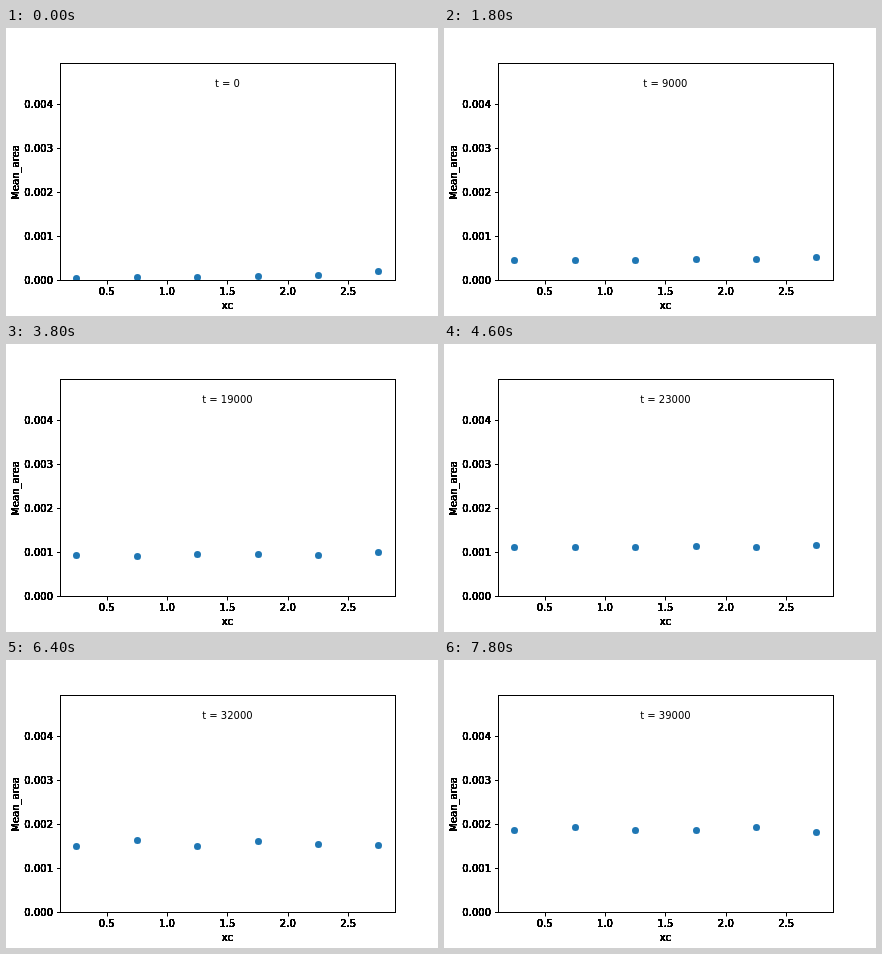
Recreate the animation shown at these times as an HTML page with a canvas. Size 432 by 288 pixels, loop 8 s.

```html
<!DOCTYPE html>
<html lang="en">
<head>
<meta charset="utf-8">
<title>Mean area over time</title>
<style>
  html, body { margin: 0; width: 100%; height: 100%; overflow: hidden; background: #fff; }
  canvas { display: block; width: 432px; height: 288px; }
</style>
</head>
<body>
<canvas id="plot" width="432" height="288"></canvas>
<script>
const ctx = document.getElementById('plot').getContext('2d');
const STEP_MS = 200, STEPS = 40;
const LEFT = 54, RIGHT = 389, TOP = 35, BOTTOM = 252, MIDDLE = 221.4;
const X_UNIT = 120.8, Y_TICK = 44;

// Each row: step, then the height of the six dots at that step.
const keys = [
  [0, 250, 249, 249, 248, 247, 243],
  [9, 232, 232, 232, 231, 231, 229],
  [13, 224, 224, 222, 222, 222, 221],
  [19, 211, 212, 210, 210, 211, 208],
  [27, 194, 194, 196, 194, 195, 194],
  [32, 186, 180, 186, 181, 184, 185],
  [39, 170, 167, 170, 170, 167, 172]
];

const xAt = value => Math.round(70.4 + (value - 0.25) * X_UNIT);

function dotY(dot, step) {
  const next = Math.max(1, keys.findIndex(key => key[0] >= step));
  const a = keys[next - 1], b = keys[next];
  const part = (step - a[0]) / (b[0] - a[0]);
  return Math.round(a[dot + 1] + (b[dot + 1] - a[dot + 1]) * part);
}

// Overprinting hardens the antialiased edges of the axis text.
function label(text, x, y, align = 'center', passes = 12) {
  ctx.textAlign = align;
  for (let i = 0; i < passes; i++) ctx.fillText(text, x, y);
}

function drawAxes() {
  ctx.fillStyle = ctx.strokeStyle = '#000';
  ctx.lineWidth = 1;
  ctx.strokeRect(LEFT + 0.5, TOP + 0.5, RIGHT - LEFT, BOTTOM - TOP);
  for (let i = 0; i < 5; i++) {
    const value = (i + 1) / 2, x = xAt(value), y = BOTTOM - i * Y_TICK;
    ctx.fillRect(x, BOTTOM + 1, 1, 3.5);
    label(value.toFixed(1), 100.6 + i * X_UNIT / 2, 267);
    ctx.fillRect(LEFT - 3, y, 3, 1);
    label((i / 1000).toFixed(3), 47, y + 4, 'right');
  }
  label('xc', MIDDLE, 281);
  ctx.save();
  ctx.translate(13, 144.5);
  ctx.rotate(-Math.PI / 2);
  label('Mean_area', 0, 0);
  ctx.restore();
}

function drawDots(step) {
  ctx.save();
  ctx.beginPath();
  ctx.rect(LEFT, TOP, RIGHT - LEFT, BOTTOM + 1 - TOP);
  ctx.clip();
  ctx.fillStyle = '#1f77b4';
  for (let dot = 0; dot < 6; dot++) {
    ctx.beginPath();
    ctx.arc(xAt(0.25 + dot / 2) + 0.5, dotY(dot, step) + 0.5, 3.5, 0, 2 * Math.PI);
    ctx.fill();
  }
  ctx.restore();
}

let shown = -1;
function render() {
  const step = Math.floor(performance.now() / STEP_MS) % STEPS;
  if (step !== shown) {
    shown = step;
    ctx.fillStyle = '#fff';
    ctx.fillRect(0, 0, 432, 288);
    ctx.font = '10px "DejaVu Sans", sans-serif';
    drawDots(step);
    drawAxes();
    label('t = ' + step * 1000, MIDDLE, 59, 'center', 1);
  }
  requestAnimationFrame(render);
}
render();
</script>
</body>
</html>
```
